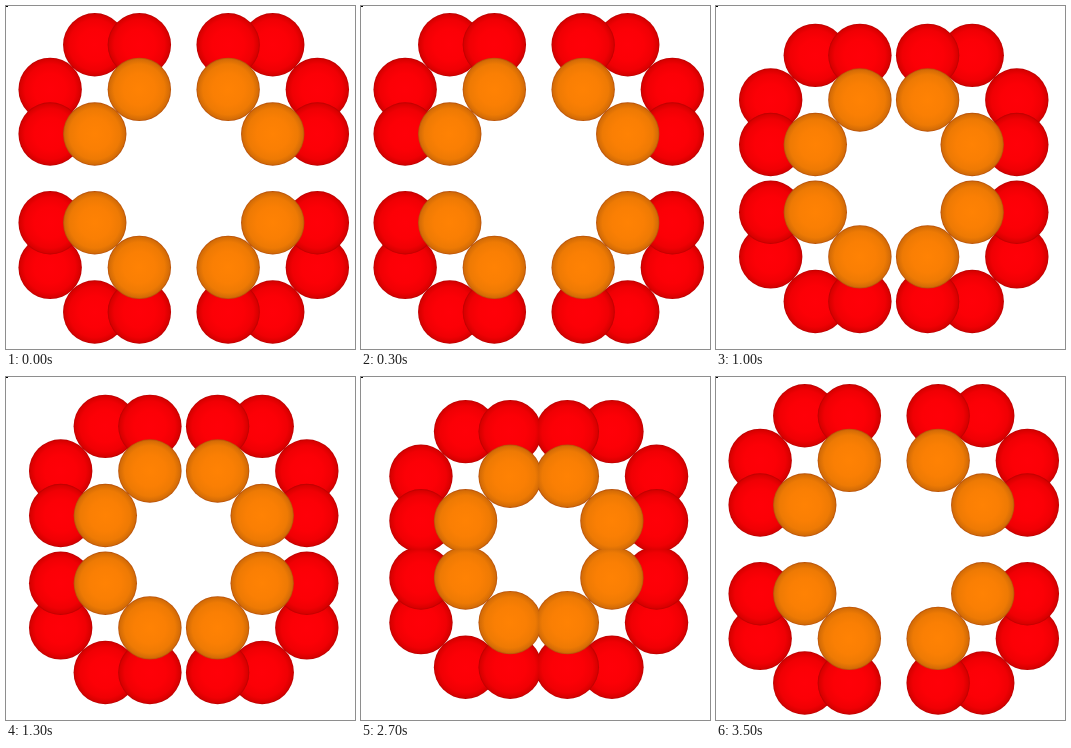
These frames come from a looping animation (349x343 px, 3600 ms). An HTML page with a canvas:

```html
<!DOCTYPE html>
<html lang="en">
<head>
<meta charset="utf-8">
<title>Sphere clusters</title>
<style>
html, body { margin: 0; width: 100%; height: 100%; overflow: hidden; background: #fff; }
canvas { display: block; }
</style>
</head>
<body>
<canvas id="stage" width="349" height="343"></canvas>
<script>
const ctx = document.getElementById('stage').getContext('2d');
const W = 349, H = 343, CX = 177.75, CY = 172.4;
const RADIUS = 31.7, UNIT = 44.6, STEP = 5.27, LOOP = 3600;

// Shades from the centre of a ball to its rim.
const RED = ['#ff0008', '#fc0006', '#f00004', '#d80000', '#b80000'];
const ORANGE = ['#ff8204', '#fa7f04', '#ee7a04', '#d46c06', '#b44c08'];
const STOPS = [0, 0.5, 0.8, 0.95, 1];

// Unit offsets from the cluster's inner corner, back to front.
const BALLS = [
  [1, 2, RED], [2, 1, RED],
  [0, 2, RED], [2, 0, RED],
  [0, 1, ORANGE], [1, 0, ORANGE]
];

function ball(x, y, shades) {
  const g = ctx.createRadialGradient(x, y, 0, x, y, RADIUS);
  STOPS.forEach((stop, i) => g.addColorStop(stop, shades[i]));
  ctx.fillStyle = g;
  ctx.beginPath();
  ctx.arc(x, y, RADIUS, 0, Math.PI * 2);
  ctx.fill();
}

// Mirrored clusters meet in flat seams, so each stays in its quadrant.
function cluster(sx, sy, gap) {
  ctx.save();
  ctx.beginPath();
  ctx.rect(178, 172, sx * W, sy * H);
  ctx.clip();
  for (const [i, j, shades] of BALLS) {
    ball(CX + sx * (gap + i * UNIT), CY + sy * (gap + j * UNIT), shades);
  }
  ctx.restore();
}

function draw(time) {
  const t = time % LOOP;
  const step = t < 3500 ? Math.min(3, Math.floor(t / 500)) : 0;
  const gap = 44.4 - step * STEP;
  ctx.fillStyle = '#fff';
  ctx.fillRect(0, 0, W, H);
  for (const sx of [-1, 1]) {
    for (const sy of [-1, 1]) cluster(sx, sy, gap);
  }
  ctx.fillStyle = '#000';
  ctx.fillRect(0, 0, 2, 1);
}

const start = performance.now();
function tick() {
  draw(performance.now() - start);
  requestAnimationFrame(tick);
}
tick();
</script>
</body>
</html>
```
